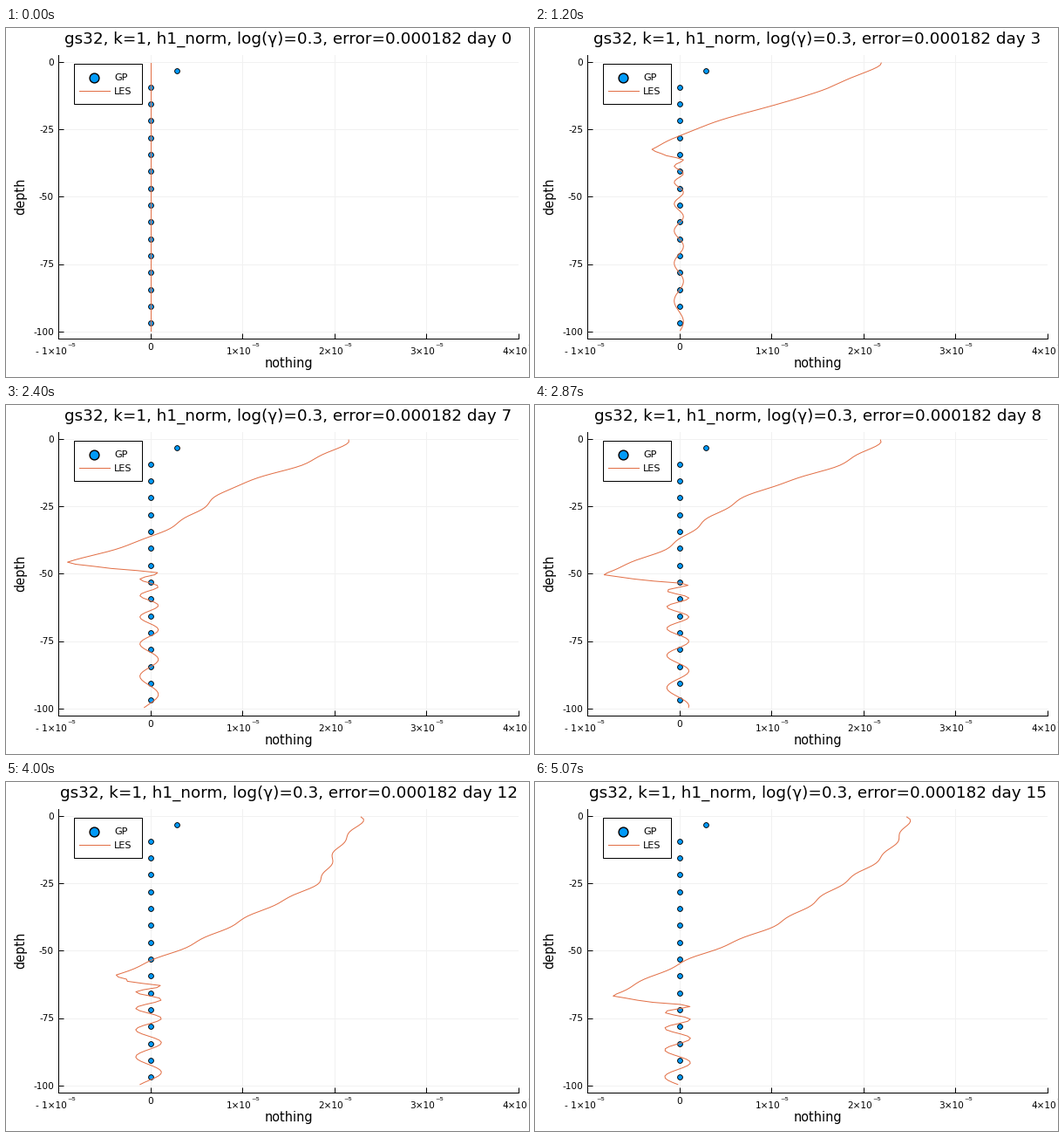
Write a matplotlib script that moves like this. It is 600x400 px and loops after 5.14 s.

```python
import numpy as np
import matplotlib.pyplot as plt
from matplotlib.animation import FuncAnimation
from matplotlib.patches import Rectangle

W, H, DPI = 600, 400, 100
LOOP, TICK, FPS, STEPS = 5140, 20, 15, 77
PX = 72 / DPI                      # one pixel in points
BLUE, ORANGE = "#009AF9", "#E26F46"
LEFT, RIGHT, TOP, BOTTOM = 60.2, 588, 31, 355.5
X0, Y0, X_UNIT, Y_UNIT = 165.8, 38.9, 105.5, 3.09

plt.rcParams["font.family"] = "DejaVu Sans"

# Step, then flux (1e-6) at equal fractions of the mixed layer, surface to base.
KEYS = np.array([
    (10, 22.4, 18.3, 12.9, 6.4, 1.4, -3.5),
    (26, 23.3, 18.4, 14.0, 6.8, 0.6, -2.5),
    (36, 22.4, 16.7, 8.7, 4.8, -0.2, -8.9),
    (49, 22.9, 17.3, 7.7, 1.4, -2.0, -7.9),
    (60, 23.6, 20.4, 18.5, 11.8, 4.7, -3.8),
    (76, 25.4, 22.6, 17.0, 10.7, 1.1, -7.3)])
depth = (np.arange(128) + .5) * 100 / 128


def monotone(x, y):
    """Monotone cubic through y at equal steps over 0..1."""
    s = np.diff(y)
    a, b = s[:-1], s[1:]
    inner = np.where(a * b > 0, 2 * a * b / (a + b + 1e-12), 0)
    m = np.concatenate([s[:1], inner, s[-1:]])
    x = np.clip(x, 0, 1) * len(s)
    i = np.minimum(x.astype(int), len(s) - 1)
    t = x - i
    return (y[i] * (1 + 2 * t) * (1 - t)**2 + y[i + 1] * t * t * (3 - 2 * t)
            + m[i] * t * (1 - t)**2 - m[i + 1] * t * t * (1 - t))


def ease(t):
    t = np.clip(t, 0, 1)
    return t * t * (3 - 2 * t)


def flux_at(n):
    """Mixed layer deepening with sqrt(time), internal waves below it."""
    if n == 0:
        return np.zeros_like(depth)
    base = 7.63 * np.sqrt(n)
    knots = np.array([np.interp(n, KEYS[:, 0], col) for col in KEYS[:, 1:].T])
    below = np.maximum(depth - base, 0)
    out = ease(below / 4)
    ripple = .25 * np.sin(.8 * depth) * (depth < base) * min(1, n / 40)
    mixed = monotone(depth / base, knots) + ripple - np.exp(-depth)
    swell = min(1.4, .028 * n) * (np.cos(2 * np.pi * np.sqrt(below)) - .15)
    return mixed * (1 - out) + swell * out


fig = plt.figure(figsize=(W / DPI, H / DPI), dpi=DPI, facecolor="white")
ax = fig.add_axes([LEFT / W, 1 - BOTTOM / H, (RIGHT - LEFT) / W, (BOTTOM - TOP) / H])
ax.set_xlim((LEFT - X0) / X_UNIT, (RIGHT - X0) / X_UNIT)
ax.set_ylim((Y0 - BOTTOM) / Y_UNIT, (Y0 - TOP) / Y_UNIT)
ax.set_xticks(range(-1, 5), [])
ax.set_yticks(range(-100, 1, 25), [])
ax.tick_params(direction="in", length=6 * PX, width=PX)
ax.grid(color="0.945", lw=PX)
ax.set_axisbelow(True)
ax.spines[["top", "right"]].set_visible(False)
ax.spines[["left", "bottom"]].set_linewidth(PX)

page = fig.add_axes([0, 0, 1, 1])
page.set(xlim=(0, W), ylim=(H, 0))
page.axis("off")


def put(x, y, text, size, ha="center", **kw):
    return page.text(x, y, text, fontsize=size * PX, ha=ha, va="baseline", **kw)


def dots(axes, x, y, size, edge):
    axes.plot(x, y, "o", ms=size * PX, mfc=BLUE, mec="black", mew=edge * PX)


for v in range(-1, 5):
    x = X0 + v * X_UNIT
    if v:
        put(x + 10, 374, f"{v}×10".replace("-", "- "), 10.5, "right")
        put(x + 10, 369, "⁻⁵", 10.5, "left")
    else:
        put(x, 369, "0", 10.5)
for v in range(0, 101, 25):
    put(55, Y0 + v * Y_UNIT + 3.8, f"{-v}", 10.5, "right")
put((LEFT + RIGHT) / 2, 389, "nothing", 14.5)
put(21.5, 193, "depth", 14.5, rotation=90, rotation_mode="anchor")
title = put((LEFT + RIGHT) / 2, 17.5, "", 18.4)

gp_depth = -3.125 - 6.25 * np.arange(16)
gp = np.where(gp_depth > -5, .285, .002)
dots(ax, gp, gp_depth, 5.8, .9)
line, = ax.plot([], [], color=ORANGE, lw=PX)

page.add_patch(Rectangle((77.8, 41.2), 77.7, 45.5, fc="white", ec="black", lw=PX))
dots(page, [101.2], [56.7], 10.8, 1.4)
page.plot([84, 119], [71.8, 71.8], color=ORANGE, lw=PX)
put(124, 60.5, "GP", 11.2, "left")
put(124, 75.8, "LES", 11.2, "left")


def draw(k):
    # the picture steps at 15 per second on a finer clock
    n = min(STEPS - 1, int((k * TICK + 15) * FPS / 1000))
    line.set_data(flux_at(n) / 10, -depth)
    title.set_text(f"gs32, k=1, h1_norm, log(γ)=0.3, error=0.000182 day {n * 5 // 24}")
    return line, title


anim = FuncAnimation(fig, draw, frames=LOOP // TICK, interval=TICK,
                     repeat=True, repeat_delay=0, blit=False)
plt.show()
```
